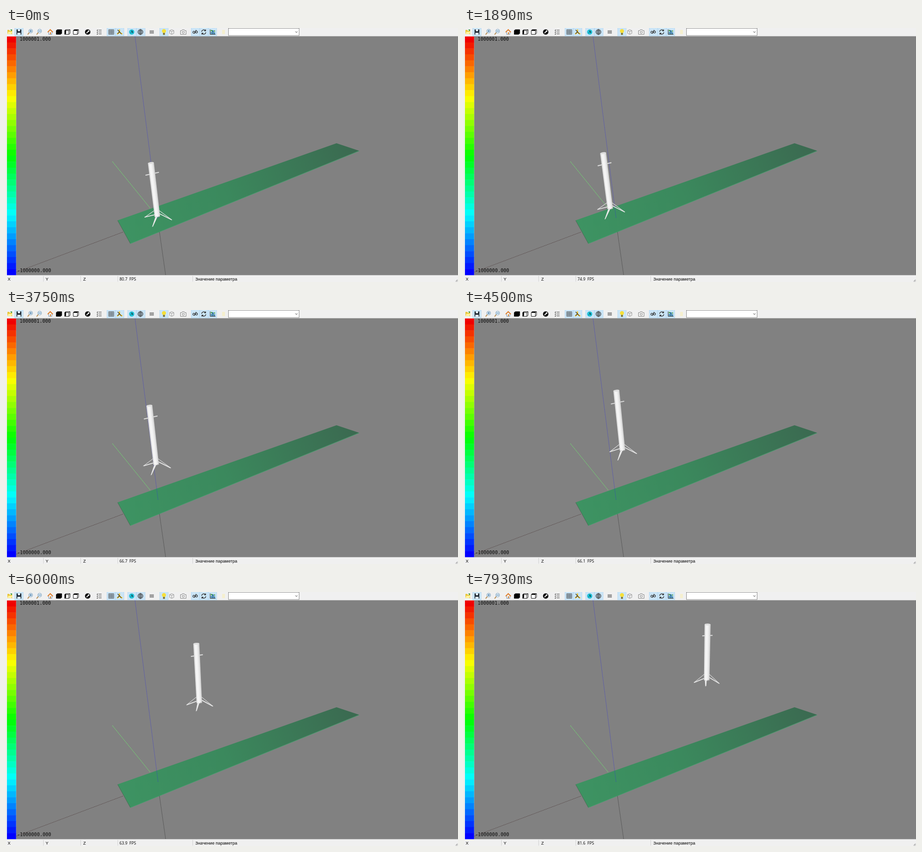
Write an HTML page that moves like this. It is 960 px wide and 540 px high and loops after 7.99 s.

```html
<!DOCTYPE html>
<html lang="ru">
<head>
<meta charset="utf-8">
<title>Rocket lift-off viewer</title>
<style>
  html, body { margin: 0; width: 100%; height: 100%; overflow: hidden; background: #f0f0f0; }
  svg { display: block; width: 100vw; height: 100vh; }
  .status { font: 9.2px "Liberation Sans", sans-serif; }
  .fps { font: 8.5px "Open Sans", sans-serif; }
  .scale { font: 10px "DejaVu Sans Mono", monospace; fill: #0a0a0a; }
  .axis { fill: none; stroke-width: 1; stroke-dasharray: 1.2 1.8; }
  .on { fill: #cbe5f7; stroke: #a5d0ee; stroke-width: .6; }
  .line { fill: none; stroke: #333; }
</style>
</head>
<body>
<svg viewBox="0 0 960 540">
  <defs>
    <linearGradient id="deck" gradientUnits="userSpaceOnUse" x1="250" y1="434" x2="726" y2="253">
      <stop offset="0" stop-color="#3d9362"/><stop offset=".45" stop-color="#3b895d"/>
      <stop offset="1" stop-color="#3b6b51"/>
    </linearGradient>
    <linearGradient id="hull">
      <stop offset="0" stop-color="#d2d2d2"/><stop offset=".3" stop-color="#f8f8f8"/>
      <stop offset=".65" stop-color="#eee"/><stop offset="1" stop-color="#cbcbcb"/>
    </linearGradient>
  </defs>

  <!-- Window and viewport -->
  <rect width="960" height="540" fill="#f0f0f0"/>
  <rect x="21.500" y="17.500" width="938.500" height="508" fill="#818181"/>
  <g id="rainbow"></g>
  <text class="scale" x="29" y="27">1000001.000</text>
  <text class="scale" x="23.500" y="519">-1000000.000</text>

  <!-- Scene -->
  <path class="axis" stroke="#3c2424" d="M248 434 22 519"/>
  <path class="axis" stroke="#222" d="M326 434 339 525"/>
  <path fill="url(#deck)" d="M237 409 702 245 750 261 264 458.500Z"/>
  <path fill="none" stroke="#4a6350" stroke-width=".8" d="M237 409 264 458"/>
  <path fill="none" stroke="#45a06e" d="M264 458.500 750 261.500"/>
  <path class="axis" stroke="#6cff6c" style="stroke-dasharray: 2 1.300" d="M226 284 307 384"/>
  <path class="axis" stroke="#3030dc" d="M274 18 323 404"/>
  <g stroke-linecap="round" fill="none">
    <path id="struts" stroke="#dcdcdc" stroke-width="1.100"/>
    <path id="legs" stroke="#e6e6e6" stroke-width="1.800"/>
    <path id="fins" stroke="#dedede" stroke-width="2" stroke-linecap="butt"/>
    <g id="body">
      <path id="tube" fill="url(#hull)"/>
      <ellipse rx="6.400" ry="2" fill="#dedede"/>
    </g>
    <path id="engine" stroke="#a0a0a0" stroke-width="1.500"/>
    <path id="frontLeg" fill="#e9e9e9"/>
  </g>

  <!-- Toolbar -->
  <g id="highlights"></g>
  <path fill="#e9c83d" d="M3 4h4l1 2h5v7H3z"/><path fill="#fff29c" d="M5 8h9l-3 5H3z"/><path fill="#4ba34a" d="M9 3h4v3h-2z"/>
  <path fill="#16202a" d="M22.500 3h10v11h-10z"/><path fill="#dce9f2" d="M25 3h5v4h-5zM24 10h7v4h-7z"/>
  <g id="zooms"></g>
  <path fill="#fff" stroke="#6b8fb8" d="M90.500 8l3.500-3.500L97.500 8v5.500h-7z"/><path fill="none" stroke="#e5812b" stroke-width="2" d="M88.500 9 94 3.500 99.500 9"/><path fill="#d08a40" d="M93 9h2.500v4.500H93z"/>
  <g id="cubes"></g>
  <circle cx="173.500" cy="8.500" r="5.800" fill="#111"/><path stroke="#eee" stroke-width="1.800" d="M171 11l4-4"/><circle cx="175.500" cy="6.500" r="1.700" fill="#eee"/>
  <path class="line" stroke-width="1.100" d="M197 4.500h6M197 8.500h6M197 12.500h6M193 4.500l1 1 1.500-2M193 8.500l1 1 1.500-2M193 12.500l1 1 1.500-2"/>
  <path class="line" stroke-width=".7" d="M218 3.500h11v10h-11zM218 6h11M218 8.500h11M218 11h11M220.700 3.500v10M223.500 3.500v10M226.200 3.500v10"/>
  <path fill="none" stroke="#f0c020" stroke-width="2.600" d="M241 3v6l-5 4M241 9l6 4"/><path class="line" stroke-width="1.200" d="M237 4l4 4 4 5M241 8l-4 4"/>
  <circle cx="267" cy="8.500" r="5.500" fill="#20bfd4"/><path stroke="#176878" d="M267 5v4l3 1M264 11l2-2"/>
  <g class="line" stroke-width=".9"><circle cx="285.500" cy="8.500" r="5.500"/><ellipse cx="285.500" cy="8.500" rx="2.500" ry="5.500"/><path d="M280 8.500h11M281 5.500h9M281 11.500h9M285.500 3v11"/></g>
  <path class="line" stroke-width="1.100" d="M305 6h9M305 8.500h9M305 11h9"/>
  <circle cx="335.500" cy="6.500" r="4.300" fill="#f6df39"/><path fill="#77702f" d="M333.500 10.500h4v4h-4z"/>
  <path fill="none" stroke="#999" d="M347.500 5.500l4.500-2 4.500 2v6l-4.500 2-4.500-2zM347.500 5.500l4.500 2 4.500-2M352 7.500v6"/>
  <path fill="none" stroke="#888" d="M370.500 5.500h3l1-2h4l1 2h3v8h-12z"/><circle cx="376.500" cy="9" r="2.300" fill="none" stroke="#888"/>
  <g class="line" stroke-width="1.200"><circle cx="399" cy="9" r="2.200"/><circle cx="404.500" cy="8.500" r="2.200"/><path d="M400 12l4-8"/></g>
  <path class="line" stroke-width="1.300" d="M415.500 8a4.500 4.500 0 0 1 8-2.500M424.500 9a4.500 4.500 0 0 1-8 2.500M424 3v3h-3M416 14v-3h3"/>
  <path class="line" d="M433.500 3v10.500H445"/><path fill="#276f9b" d="M435 8h2v5h-2zM438 5h3v8h-3zM442 9h2v4h-2z"/><path fill="#51a254" d="M435 4h3v3h-3zM442 5h2v3h-2z"/>
  <path fill="#f5efcf" d="M459 4h6v9h-6z"/>
  <rect x="472.500" y=".5" width="150" height="15.500" fill="#fff" stroke="#8c8c8c"/>
  <path class="line" stroke="#555" d="M614.500 7.500l2.300 2 2.300-2"/>

  <!-- Status bar -->
  <path stroke="#d2d2d2" d="M79.500 527v12M158.500 527v12M237.500 527v12M396.500 527v12"/>
  <g class="status">
    <text x="3.500" y="537">X</text><text x="84" y="537">Y</text><text x="164" y="537">Z</text>
    <text x="402" y="537">Значение параметра</text>
  </g>
  <g class="fps"><text id="rate" x="241" y="537"></text><text x="262" y="537">FPS</text></g>
  <path fill="#b5b5b5" d="M959 534v5h-5z"/>
</svg>

<script>
const LOOP = 7990;
const $ = id => document.getElementById(id);
const setPath = (id, d) => $(id).setAttribute('d', d);

// Key points of the flight: time, base x, top y
const flight = [
  [0, 321.5, 287], [870, 321.5, 282], [1890, 310.5, 266], [2940, 309.5, 236],
  [4500, 336.5, 171.5], [6000, 410.5, 110], [6810, 471.5, 84.5], [7930, 515.5, 69]
];
const rates = [80.7, 78.2, 74.9, 66.1, 66.7, 66.1, 65.2, 63.9, 74.9, 81.6];
// All upright lines of the scene meet here
const vanishing = { x: 490, y: 1800 };

// Smooth cubic through unevenly spaced keys
function sample(keys, time) {
  const last = keys.length - 1;
  const t = Math.min(time, keys[last][0]);
  let i = 0;
  while (i < last - 1 && t >= keys[i + 1][0]) i++;
  const a = keys[i], b = keys[i + 1];
  const before = keys[Math.max(i - 1, 0)], after = keys[Math.min(i + 2, last)];
  const span = b[0] - a[0], u = (t - a[0]) / span;
  return a.slice(1).map((p, k) => {
    const q = b[k + 1];
    const m = (q - before[k + 1]) / (b[0] - before[0]) * span;
    const n = (after[k + 1] - p) / (after[0] - a[0]) * span;
    return p + u * (m + u * (3 * (q - p) - 2 * m - n + u * (2 * (p - q) + m + n)));
  });
}

function drawRocket(time) {
  const [x, top] = sample(flight, time);
  // The rocket comes nearer to the camera, then recedes
  const length = 114 + 13.3 * Math.sin(Math.PI * time / 9900) ** 2;
  const y = top + length;
  const lean = length * (vanishing.x - x) / (vanishing.y - y);
  const topX = x - lean;
  const hull = Math.hypot(lean, length);
  const angle = -Math.atan2(lean, length) * 180 / Math.PI;

  const left = { x: x - 27, y: y + 1.5 + (401 - y) / 60 };
  const right = { x: x + 27.3 + lean / 4, y: y + 7 };
  const front = { x: x - 3.2 - lean * 0.53, y: y + 14.3 + lean * 0.57 };
  const strut = { x: x - lean * 0.1, y: y - 13 };
  const fin = { x: topX + lean * 0.2, y: top + length * 0.2, reach: 11.3 + lean * 0.22, tilt: 0.8 + lean * 0.17 };

  $('body').setAttribute('transform', `translate(${topX} ${top}) rotate(${angle})`);
  setPath('tube', `M-6.4 0L-5.8 ${hull}Q0 ${hull + 2} 5.8 ${hull}L6.4 0Z`);
  setPath('struts', `M${left.x} ${left.y}L${strut.x - 5} ${strut.y}M${right.x} ${right.y}L${strut.x + 5} ${strut.y}`);
  setPath('legs', `M${left.x + 1} ${left.y - .5}L${x - 5} ${y - 4}M${right.x - 1} ${right.y - .5}L${x + 5} ${y - 6}`);
  setPath('frontLeg', `M${x - 4} ${y}L${x} ${y + 1}L${front.x + 1.2} ${front.y - 1}L${front.x - .8} ${front.y}Z`);
  setPath('engine', `M${x - 3} ${y + .5}l1 .5M${x + 2} ${y + .5}l2 -.5`);
  setPath('fins', `M${fin.x - fin.reach} ${fin.y + fin.tilt}L${fin.x + fin.reach} ${fin.y - fin.tilt}`);
}

const bands = 40, bandHeight = 507 / bands;
$('rainbow').innerHTML = Array.from({ length: bands }, (_, i) =>
  `<rect x="2" y="${18 + i * bandHeight}" width="19.5" height="${bandHeight + .5}"
    fill="hsl(${240 * i / (bands - 1)} 100% ${47 + Math.min(i, 6) / 2}%)"/>`).join('');

const highlighted = [18, 214, 232, 258, 277, 326, 393, 411, 429];
$('highlights').innerHTML = highlighted.map(x =>
  `<rect class="on" x="${x + .3}" y="-1" width="18" height="18"/>`).join('');
$('zooms').innerHTML = [[52, 'M50 6.500h5M52.500 4v5'], [71, 'M69 6.500h5']].map(([x, sign]) =>
  `<path stroke="#b58a4d" stroke-width="2" d="M${x - 2} 9l-4 5"/>
   <circle cx="${x + .5}" cy="6.500" r="4" fill="#e3f1fa" stroke="#7297b5"/>
   <path stroke="#33699a" d="${sign}"/>`).join('');
const solidCube = 'M0 5l3-2h9v9l-3 2H0z', leftFace = 'M0 5l3-2v9l-3 2z', topFace = 'M0 5l3-2h9l-3 2z';
$('cubes').innerHTML = [solidCube, leftFace, topFace].map((face, i) =>
  `<g transform="translate(${106.500 + 18 * i} 0)">
   <path fill="#fff" stroke="#111" d="M.5 5.500l2.500-2h8.500v8l-2.500 2H.5zM.5 5.500H9l2.500-2M9 5.500v8"/>
   <path d="${face}"/></g>`).join('');

function frame(now) {
  const time = now % LOOP;
  drawRocket(time);
  $('rate').textContent = rates[Math.floor(time / 800)].toFixed(1);
  requestAnimationFrame(frame);
}
frame(performance.now());
</script>
</body>
</html>
```
